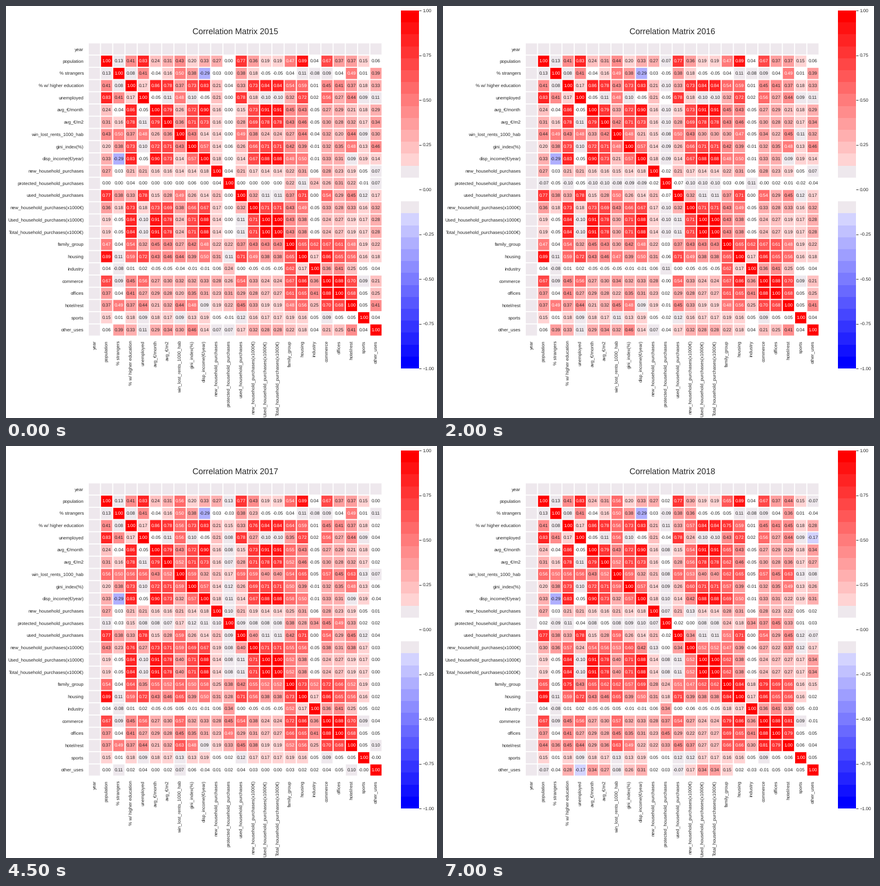
A matplotlib script that plays this animation: 765 px wide and 732 px high, repeating every 8000 ms.

```python
import numpy as np
import matplotlib.pyplot as plt
from matplotlib.animation import FuncAnimation

plt.rcParams["font.family"] = "Liberation Sans"
plt.rcParams["text.hinting"] = "none"

W, H, DPI = 765, 732, 64
PT = 72 / DPI  # points per pixel
LEFT, RIGHT, TOP, BOTTOM = 146, 667.5, 65.5, 586.5
BAR = (701, 733, 644, 8)
INK = "#262626"
LAVENDER = (0.937, 0.91, 0.933)
BANDS = 15  # colour steps on each side of zero

FACTORS = ("size", "wealth", "migrant", "trade", "family")
PURCHASES = "_household_purchases"

# How strongly each variable follows the hidden factors; the correlation of
# two variables is the dot product of their loadings.
LOADS = {
    "population": dict(size=.95, wealth=.2),
    "% strangers": dict(size=.15, wealth=-.05, migrant=.9),
    "% w/ higher education": dict(size=.25, wealth=.88, migrant=.1, trade=.1),
    "unemployed": dict(size=.9, wealth=-.1, migrant=.3),
    "avg_€/month": dict(size=.05, wealth=.96),
    "avg_€/m2": dict(size=.15, wealth=.82, migrant=.2),
    "win_lost_rents_1000_hab": dict(size=.4, wealth=.25, migrant=.5),
    "gini_index(%)": dict(size=.05, wealth=.75, migrant=.45, trade=.15),
    "disp_income(€/year)": dict(size=.15, wealth=.93, migrant=-.3),
    "new" + PURCHASES: dict(size=.25, wealth=.15, trade=.12),
    "protected" + PURCHASES: dict(trade=.37, family=.1),
    "used" + PURCHASES: dict(size=.78, wealth=.12, migrant=.3),
    f"new{PURCHASES}(x1000€)": dict(size=.22, wealth=.75, migrant=.2),
    f"Used{PURCHASES}(x1000€)": dict(wealth=.95),
    f"Total{PURCHASES}(x1000€)": dict(wealth=.95),
    "family_group": dict(size=.4, wealth=.45, trade=.42, family=.65),
    "housing": dict(size=.85, wealth=.4, trade=.3),
    "industry": dict(size=.05, wealth=-.05, migrant=-.1, trade=.48, family=.65),
    "commerce": dict(size=.65, wealth=.25, trade=.7),
    "offices": dict(size=.33, wealth=.28, trade=.85),
    "hotel/rest": dict(size=.35, wealth=.2, migrant=.5, trade=.6),
    "sports": dict(size=.12, wealth=.18, trade=-.05, family=.12),
    "other_uses": dict(wealth=.3, migrant=.45, trade=.2),
}
LABELS = ["year", *LOADS]
N = len(LABELS)

# Variables whose loadings move, year by year
CHANGES = {
    2015: {},
    2016: {
        "win_lost_rents_1000_hab": dict(wealth=.32),
        "protected" + PURCHASES: dict(size=-.05, wealth=-.1, migrant=-.05, trade=.08),
    },
    2017: {
        "win_lost_rents_1000_hab": dict(size=.5, wealth=.42, trade=.2),
        "protected" + PURCHASES: dict(size=.12, wealth=.08, trade=.5, family=.15),
        f"new{PURCHASES}(x1000€)": dict(size=.3, migrant=.25),
        "family_group": dict(size=.45, wealth=.55, family=.5),
        "other_uses": dict(wealth=0, migrant=.12, trade=.06),
    },
    2018: {
        "protected" + PURCHASES: dict(size=0, migrant=-.1),
        f"new{PURCHASES}(x1000€)": dict(size=.2, wealth=.55, migrant=.4),
        "family_group": dict(size=.55, wealth=.65, trade=.38, family=0),
        "hotel/rest": dict(size=.4, wealth=.28, migrant=.35, trade=.68),
        "other_uses": dict(size=-.15, wealth=.36, migrant=0, trade=0),
    },
}


def correlations(loads):
    a = np.array([[row.get(f, 0) for f in FACTORS] for row in loads.values()])
    same = (a[:, None] == a[None]).all(axis=2)
    return np.where(same, 1, a @ a.T)


def yearly_matrices():
    loads, out = LOADS, {}
    for year, changes in CHANGES.items():
        loads = {k: row | changes.get(k, {}) for k, row in loads.items()}
        out[year] = correlations(loads)
    return out


def band(v):
    return min(int(abs(v) * BANDS + 1e-9), BANDS - 1)


def shade(v):
    k = band(v)
    if k == 0:
        return (1, 1, 1)
    if k == 1:
        return LAVENDER
    pale = 1 - (2 * k + 1) / (2 * BANDS - 1)
    return (1, pale, pale) if v > 0 else (pale, pale, 1)


fig = plt.figure(figsize=(W / DPI, H / DPI), dpi=DPI, facecolor="white")
ax = fig.add_axes([0, 0, 1, 1])
ax.axis("off")


def write(x, y, s, px=8.15, **kw):
    opts = dict(ha="center", va="center", color=INK) | kw
    return ax.text(x, y, s, fontsize=px * PT, **opts)


xs = np.linspace(LEFT, RIGHT, N + 1)
ys = np.linspace(TOP, BOTTOM, N + 1)
xc = (xs[1:] + xs[:-1]) / 2
yc = (ys[1:] + ys[:-1]) / 2

heat = ax.imshow(np.ones((N, N, 3)), extent=(LEFT, RIGHT, BOTTOM, TOP),
                 interpolation="nearest")
grid = dict(color="white", lw=1.9 * PT, snap=False)
ax.vlines(xs, TOP, BOTTOM, **grid)
ax.hlines(ys, LEFT, RIGHT, **grid)

steps = (np.arange(2 * BANDS) + 0.5) / BANDS - 1
ax.imshow([[shade(v)] for v in steps[::-1]], extent=BAR, interpolation="nearest")
for v in np.linspace(-1, 1, 9):
    y = (BAR[2] + BAR[3]) / 2 - v * (BAR[2] - BAR[3]) / 2
    ax.hlines(y, BAR[1], BAR[1] + 4, color=INK, lw=0.9 * PT)
    write(BAR[1] + 6.5, y, f"{v:.2f}".replace("-", "−"), ha="left",
          va="center_baseline")

for x, y, name in zip(xc, yc, LABELS):
    write(LEFT - 8, y, name, ha="right", va="center_baseline")
    write(x, BOTTOM + 8, name, rotation=90, va="top")

title = write((LEFT + RIGHT) / 2, 50.5, "", px=14.6, va="baseline")
cells = [[write(x, y, "") for x in xc[1:]] for y in yc[1:]]

ax.set(xlim=(0, W), ylim=(H, 0), aspect="auto")

MATRICES = yearly_matrices()


def draw(i):
    # half a second of the first year, then 2.5 s for each later one
    year = 2015 + (i + 4) // 5
    m = MATRICES[year]
    title.set_text(f"Correlation Matrix {year}")
    rgb = np.empty((N, N, 3))
    rgb[:] = LAVENDER
    for r, row in enumerate(cells):
        for c, label in enumerate(row):
            v = m[r, c]
            rgb[r + 1, c + 1] = shade(v)
            label.set_text(f"{v:.2f}")
            label.set_color("white" if band(v) >= 7 else INK)
    heat.set_data(rgb)
    return [heat, title]


anim = FuncAnimation(fig, draw, frames=16, interval=500, repeat=True,
                     repeat_delay=0, blit=False)
plt.show()
```
